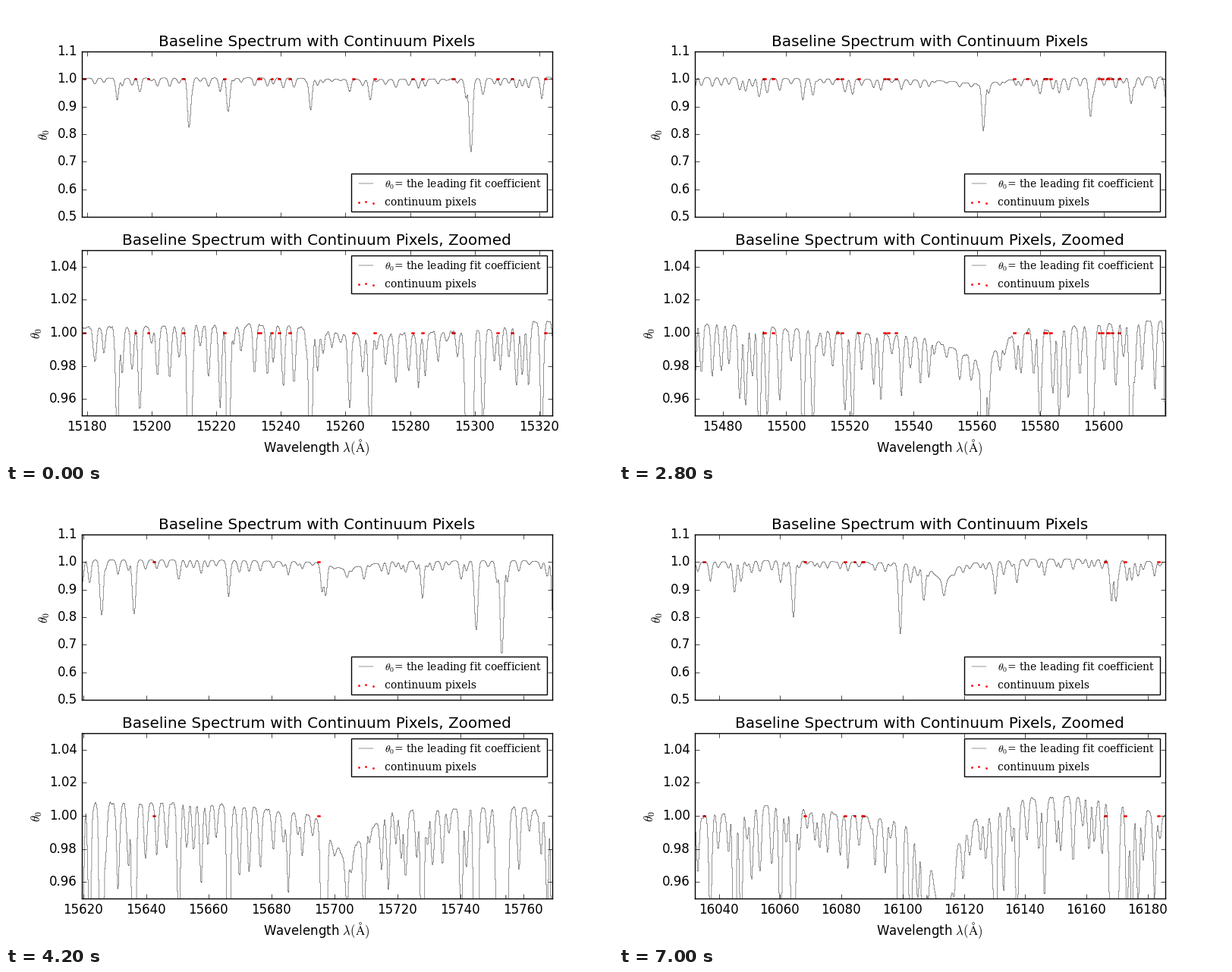
These frames come from a looping animation (800 px wide and 600 px high, 8 s). A matplotlib script:

```python
import numpy as np
import matplotlib.pyplot as plt
from matplotlib.animation import FuncAnimation
from matplotlib.patches import Rectangle

plt.style.use("classic")
plt.rcParams.update({"figure.dpi": 100, "savefig.dpi": 100,
                     "figure.facecolor": "white", "font.sans-serif": ["DejaVu Sans"]})

W, H = 800, 600
X0, X1 = 100, 720           # left and right edge of both panels, in pixels
PAGES, CHUNK = 6, 691       # views, and spectrum samples per view
SIGMA = 0.45                # width of an absorption line, in angstrom
THETA = r"$\theta_0$"

# Deepest lines: wavelength above 15000, depth in thousandths
STRONG = np.array([
    (211.6, 174), (223.7, 118), (249.2, 113), (298.8, 262), (339.4, 182), (381.0, 120),
    (398.9, 108), (400.0, 92), (562.1, 187), (595.8, 137), (608.6, 90), (625.9, 186),
    (636.2, 187), (666.3, 125), (696.0, 108), (697.1, 122), (727.9, 131), (745.0, 246),
    (753.2, 335), (769.9, 370), (773.7, 223), (892.9, 410), (896.9, 105), (964.4, 295),
    (985.2, 163), (1011.3, 132), (1045.1, 110), (1064.3, 200), (1099.2, 260),
    (1106.9, 140), (1130.2, 116), (1168.2, 140), (1169.6, 142)])

# Broad shape of the continuum: wavelength above 15000, level in thousandths
LEVEL = np.array([
    (178, 3), (240, 5), (262, -2), (300, 1), (320, 7), (400, 4), (440, -10), (470, 6),
    (545, -3), (562, -18), (572, 0), (612, 7), (660, 8), (694, 0), (703, -25), (717, 3),
    (760, 5), (776, -2), (906, 14), (932, 9), (960, -1), (1028, -3), (1055, 6),
    (1100, -3), (1109, -27), (1113.6, -78), (1118, -18), (1124, -2), (1140, 10),
    (1160, 12), (1186, 0)])


def spectrum(wl, rng):
    """Continuum minus blended Gaussian lines; the weak lines are random."""
    weak = wl[0] + np.cumsum(rng.uniform(1.3, 4.2, 370))
    faint = np.clip(27 * rng.lognormal(0, 0.6, weak.size), 6, 75)
    knots = LEVEL + (15000, 0)
    pos = np.append(STRONG[:, 0] + 15000, weak)
    depth = np.append(STRONG[:, 1], faint) + np.interp(pos, *knots.T)
    sigma = SIGMA * (1 + np.abs(depth) / 1500)
    dips = depth * np.exp(-0.5 * ((wl[:, None] - pos) / sigma) ** 2)
    noise = np.convolve(rng.normal(0, 0.8, wl.size), [0.25, 0.5, 0.25], "same")
    level = np.interp(wl, *knots.T)
    return 1 + (level - np.sqrt((dips ** 2).sum(axis=1)) + noise) / 1000


def pick_dots(wl, flux, rng):
    """Random close pairs of samples where the spectrum is near one."""
    near = np.flatnonzero(np.abs(flux - 1) < 0.006)
    first = rng.choice(near, 130, replace=False)
    return wl[np.clip(np.append(first, first + 2), 0, wl.size - 1)]


def px(x, y):
    return np.asarray(x) / W, 1 - np.asarray(y) / H


def legend(ax, top):
    """Key box whose top edge lies at the given pixel row."""
    on_fig = dict(transform=fig.transFigure, zorder=6)
    ax.add_patch(Rectangle(px(455, top + 50), 258 / W, 50 / H, fc="w", ec="k", lw=1,
                           **on_fig))
    ax.plot(*px([464.7, 484.1], [top + 13.1] * 2), "k", lw=0.3, **on_fig)
    ax.scatter(*px([464.7, 474.4, 484.1], top + np.array([38.4, 37.1, 39.0])),
               s=1, color="r", linewidths=1, clip_on=False, **on_fig)
    font = dict(family="DejaVu Serif", size=10, va="baseline")
    fig.text(*px(499, top + 18), THETA + "= the leading fit coefficient", **font)
    fig.text(*px(499, top + 42), "continuum pixels", **font)


# Logarithmic wavelength grid with a gap between two detectors
pixel = np.arange(371, 5997)
gap = (pixel >= 3192) & (pixel < 3697)
wl = 10 ** (4.179 + 6e-6 * pixel)
rng = np.random.default_rng(4)
flux = np.where(gap, np.nan, spectrum(wl, rng))
dots = pick_dots(wl, flux, rng)

bounds = 1 + CHUNK * np.arange(PAGES + 1)
bounds[0] = 0
limits = [(wl[~gap][a], wl[~gap][b - 1]) for a, b in zip(bounds, bounds[1:])]

fig, axes = plt.subplots(2, figsize=(W / 100, H / 100), dpi=100)
fig.subplots_adjust(left=0.125, right=0.9, bottom=0.1, top=0.9, hspace=0.2)
title = "Baseline Spectrum with Continuum Pixels"
setup = [(title, (0.5, 1.1), np.arange(5, 12) / 10, "%.1f", 221),
         (title + ", Zoomed", (0.95, 1.05), np.arange(96, 105, 2) / 100, "%.2f", 329)]
for ax, (name, ylim, ticks, fmt, key_top) in zip(axes, setup):
    ax.set_title(name, x=0.5 - 0.5 / (X1 - X0))
    ax.set_ylabel(THETA)
    ax.set_yticks(ticks, [fmt % t for t in ticks])
    ax.tick_params(axis="y", pad=4.36)
    ax.tick_params(axis="x", labelbottom=False)
    ax.plot(wl, flux, "k", lw=0.3, drawstyle="steps-mid")
    ax.scatter(dots, np.ones_like(dots), s=1, color="r", linewidths=1)
    legend(ax, key_top)
    ax.set_ylim(ylim)
fig.text(*px(409.5, 588), r"Wavelength $\lambda (\mathrm{\AA})$", size=12,
         ha="center", va="baseline")


def tick_values(lo, hi):
    step = 20 if hi - lo < 200 else 50
    return np.arange(np.ceil(lo / step) * step, hi, step)


def tick_labels(lo, hi):
    values = tick_values(lo, hi)
    x = X0 + (values - lo) / (hi - lo) * (X1 - X0) - 0.5
    return [fig.text(*px(a, 560), "%d" % v, size=12, ha="center", va="baseline")
            for a, v in zip(x, values)]


labels = [tick_labels(*lim) for lim in limits]


def update(i):
    page = min(i // 7, PAGES - 1)
    for ax in axes:
        ax.set_xticks(tick_values(*limits[page]))
        ax.set_xlim(limits[page])
    for n, group in enumerate(labels):
        for text in group:
            text.set_visible(n == page)
    return []


anim = FuncAnimation(fig, update, frames=40, interval=200, repeat=True,
                     repeat_delay=0, blit=False)
plt.show()
```
